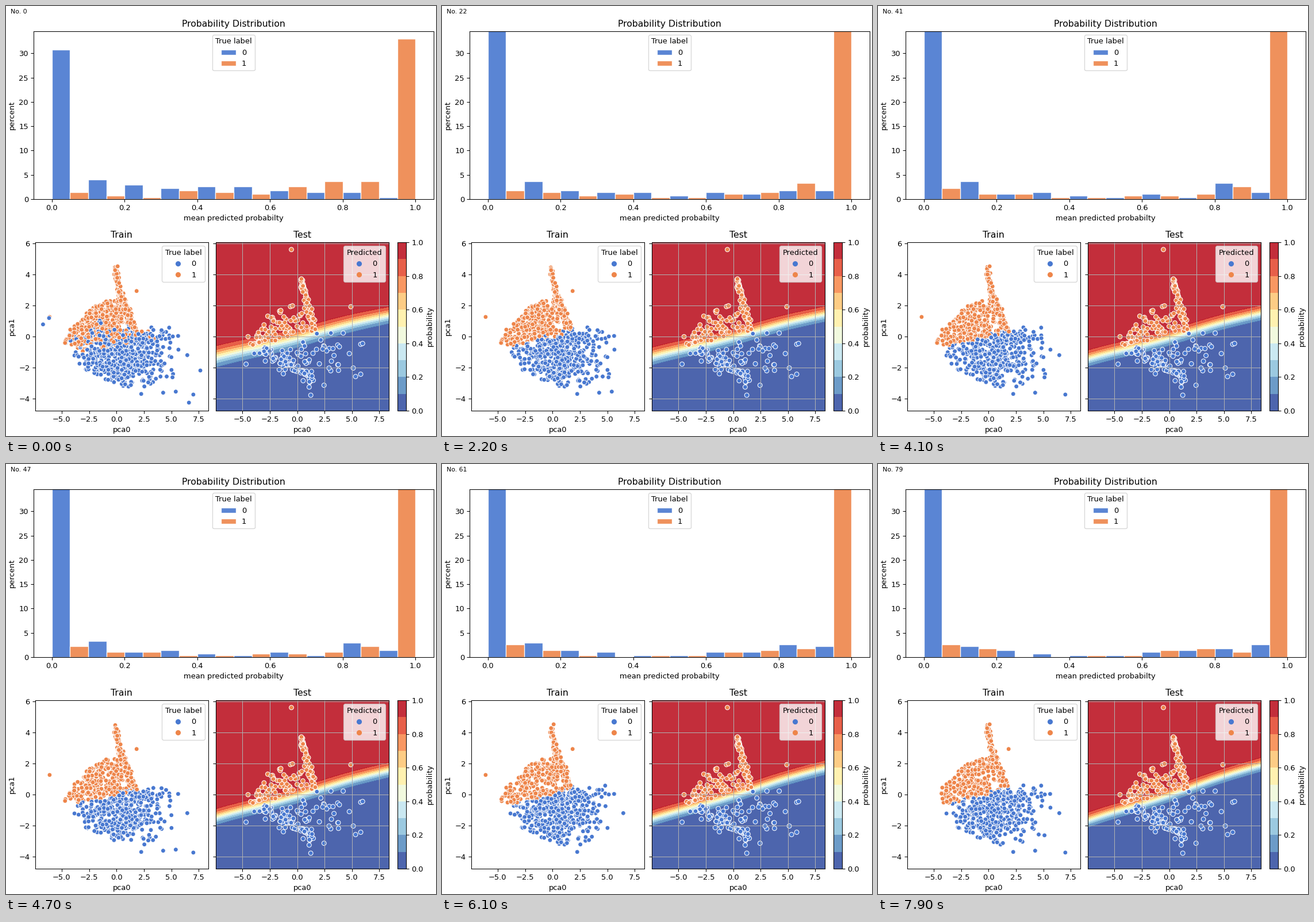
Write a matplotlib script that moves like this. It is 748x748 px and loops after 8000 ms.

```python
import numpy as np
import matplotlib.pyplot as plt
from matplotlib.animation import FuncAnimation
from matplotlib.lines import Line2D
from matplotlib.patches import Patch

SIZE, FRAMES = 748, 80
COLORS = np.array(["#4878d0", "#ee854a"])
XLIM, YLIM = (-7.43, 8.37), (-4.78, 6.07)
LEVELS = np.linspace(0, 1, 11)
TEST_SIZE, CLASS_SIZES = 273, (137, 136)

KEYS = [0, 10, 41, 79]

# Counts per inner bin; the remaining bin of each class takes the rest.
NEGATIVE = [
    [11, 8, 6, 7, 7, 5, 4, 4, 1],
    [10, 6, 4, 6, 2, 4, 5, 2, 5],
    [10, 3, 4, 2, 1, 3, 1, 9, 4],
    [6, 4, 2, 1, 1, 3, 4, 5, 7],
]
POSITIVE = [
    [4, 2, 1, 5, 4, 3, 7, 10, 10],
    [4, 4, 2, 4, 1, 1, 4, 5, 10],
    [6, 3, 3, 1, 1, 2, 2, 3, 7],
    [7, 5, 0, 0, 1, 1, 4, 5, 3],
]

# Decision boundary: height at the left and right edge, band thickness at both.
BOUNDARY = [
    [-1.33, 1.41, 1.37, 1.07],
    [-1.22, 1.44, 1.19, 1.00],
    [-1.44, 1.56, 1.04, 0.96],
    [-1.67, 1.96, 0.96, 0.89],
]

EARLY_STRAYS = [(-6.7, 0.78), (-6.15, 1.19), (7.64, -2.19), (6.6, -4.26)]
TRAIN_STRAYS = [
    (-6.1, 1.26), (1.83, 2.93), (0.1, 4.52), (7.0, -3.74), (6.45, -1.2),
    (5.4, -3.55), (4.25, -3.62), (4.8, 0.57), (2.25, -3.7),
]
TEST_STRAYS = [
    (-0.53, 5.6), (4.9, 1.92), (-4.67, -1.78), (1.24, -3.78), (2.45, -3.14),
    (5.33, -2.58), (5.8, -2.43), (3.77, -2.18), (5.12, -2.03), (4.76, -1.1),
    (4.2, 0.22), (5.8, -0.5), (5.97, -0.45), (3.08, 0.22),
]


def envelope_sample(rng, x, low, high, a, b):
    return np.column_stack([x, low + (high - low) * rng.beta(a, b, len(x))])


def split_line(x):
    return 0.1 + 0.18 * x


def wing(rng, n, scale):
    x = rng.triangular(-4.9, -1.0, 1.3, n)
    top = 2.5 - 0.1 * (x - 0.3) ** 2
    return envelope_sample(rng, x, split_line(x), top * scale, 1.1, 1.3)


def column(rng, n, top, bottom, curve):
    y = top - (top - bottom) * rng.beta(1.25, 1, n)
    drop = top - y
    return np.column_stack([curve(drop) + rng.normal(0, 0.07 + 0.04 * drop), y])


def make_train():
    rng = np.random.default_rng(7)
    x = rng.normal(0.9, 2.1, 640)
    outside = np.abs(x - 0.7) > 5.05
    x[outside] = rng.uniform(-3, 4, outside.sum())
    low = -3.5 + 0.058 * (x - 2) ** 2
    high = np.minimum(split_line(x), 0.75)
    body = envelope_sample(rng, x, low, high, 1.8, 1.4)
    spine = column(rng, 190, 4.5, 0.3, lambda d: -0.1 + 0.1 * d + 0.083 * d**2)
    points = np.vstack([body, wing(rng, 370, 1), spine])
    rng.shuffle(points)
    noise = np.append(rng.normal(size=len(points)), np.zeros(len(TRAIN_STRAYS)))
    return np.vstack([points, TRAIN_STRAYS]), noise


def make_test():
    rng = np.random.default_rng(11)
    spine = column(rng, 68, 3.8, 0.25, lambda d: 0.3 + 0.36 * d)
    x = rng.uniform(-3.1, 1.5, 72)
    diagonal = np.column_stack([x, -2.15 - 0.4 * x + rng.normal(0, 0.27, 72)])
    cloud = rng.normal((0.9, -0.9), (1.2, 0.5), (26, 2))
    right = rng.normal((3.2, -1.2), (0.7, 0.4), (11, 2))
    tip = rng.normal((1.0, -2.6), (0.45, 0.3), (12, 2))
    tail_x = rng.uniform(-4.4, -3.3, 8)
    tail = np.column_stack([tail_x, rng.uniform(-1.2, 0, 8)])
    return np.vstack([wing(rng, 72, 0.85), spine, diagonal, cloud, right, tip,
                      tail, TEST_STRAYS])


def at_step(table, step):
    return np.array([np.interp(step, KEYS, values) for values in np.transpose(table)])


def logit(step, x, y):
    left, right, thick_left, thick_right = at_step(BOUNDARY, step)
    along = (x - XLIM[0]) / (XLIM[1] - XLIM[0])
    center = left + (right - left) * along + 0.05 * np.sin(9 * along + 1)
    thickness = thick_left + (thick_right - thick_left) * along
    return 4.394 * (y - center) / thickness


def train_sample(step):
    rng = np.random.default_rng(1000 + step)
    keep = rng.random(len(train)) < 0.64 + 0.36 * np.exp(-step / 15)
    x, y = train.T
    noise = 0.1 + 0.5 * np.exp(-step / 4)
    labels = (y - split_line(x) + noise * train_noise > 0).astype(int)
    points, labels = train[keep], labels[keep]
    if step < 4:
        points = np.vstack([points, EARLY_STRAYS])
        labels = np.append(labels, np.zeros(len(EARLY_STRAYS), int))
    return points, labels


def add_axes(left, top, right, bottom):
    return fig.add_axes([left / SIZE, 1 - bottom / SIZE,
                         (right - left) / SIZE, (bottom - top) / SIZE])


def dots(ax, linewidth):
    return ax.scatter([], [], s=36, edgecolor="white", linewidth=linewidth)


def dot_legend(ax, title):
    handles = [Line2D([], [], ls="", marker="o", ms=6, color=c) for c in COLORS]
    ax.legend(handles, ["0", "1"], title=title, loc="upper right")


def set_dots(artist, points, labels):
    artist.set_offsets(points)
    artist.set_facecolor(COLORS[labels])


def draw_contour(step):
    p = 1 / (1 + np.exp(-logit(step, grid_x, grid_y)))
    return test_ax.contourf(grid_x, grid_y, p, levels=LEVELS, cmap="RdYlBu_r",
                            alpha=0.9, zorder=0.5)


plt.rcParams["font.family"] = "DejaVu Sans"
fig = plt.figure(figsize=(8, 8), dpi=93.5)
train, train_noise = make_train()
test = make_test()
grid_x, grid_y = np.meshgrid(np.linspace(*XLIM, 100), np.linspace(*YLIM, 140))

counter = fig.text(7.5 / SIZE, 1 - 13 / SIZE, "", fontsize="small")

hist_ax = add_axes(48, 43.5, 744, 336)
hist_ax.set(title="Probability Distribution", xlabel="mean predicted probabilty",
            ylabel="percent", xlim=(-0.05, 1.05), ylim=(0, 34.615))
bars = [hist_ax.bar(np.arange(10) / 10 + shift, np.zeros(10), 0.05, align="edge",
                    color=color, alpha=0.9, edgecolor="white", linewidth=1)
        for shift, color in zip((0, 0.05), COLORS)]
hist_ax.legend([Patch(facecolor=c, edgecolor="white", alpha=0.9) for c in COLORS],
               ["0", "1"], title="True label", loc="upper center")

train_ax = add_axes(50.5, 411, 352, 704)
test_ax = add_axes(365, 411, 666, 704)
for ax, title in ((train_ax, "Train"), (test_ax, "Test")):
    ax.set(title=title, xlabel="pca0", xlim=XLIM, ylim=YLIM,
           xticks=np.arange(-5, 8, 2.5), yticks=range(-4, 7, 2))
train_ax.set_ylabel("pca1")
test_ax.tick_params(labelleft=False)
test_ax.grid(True)
train_dots, test_dots = dots(train_ax, 0.7), dots(test_ax, 0.8)
dot_legend(train_ax, "True label")
dot_legend(test_ax, "Predicted")

contour = draw_contour(0)
color_ax = add_axes(681, 411, 696, 704)
fig.colorbar(contour, cax=color_ax, label="probability", ticks=LEVELS[::2])


def update(step):
    global contour
    counter.set_text(f"No. {step}")
    inner = [np.rint(at_step(table, step)) for table in (NEGATIVE, POSITIVE)]
    counts = (np.r_[CLASS_SIZES[0] - inner[0].sum(), inner[0]],
              np.r_[inner[1], CLASS_SIZES[1] - inner[1].sum()])
    for group, values in zip(bars, counts):
        for bar, value in zip(group, values):
            bar.set_height(100 * value / TEST_SIZE)
    set_dots(train_dots, *train_sample(step))
    set_dots(test_dots, test, (logit(step, *test.T) > 0).astype(int))
    contour.remove()
    contour = draw_contour(step)


animation = FuncAnimation(fig, update, frames=FRAMES, interval=100,
                          init_func=lambda: None, repeat=True)
plt.show()
```
